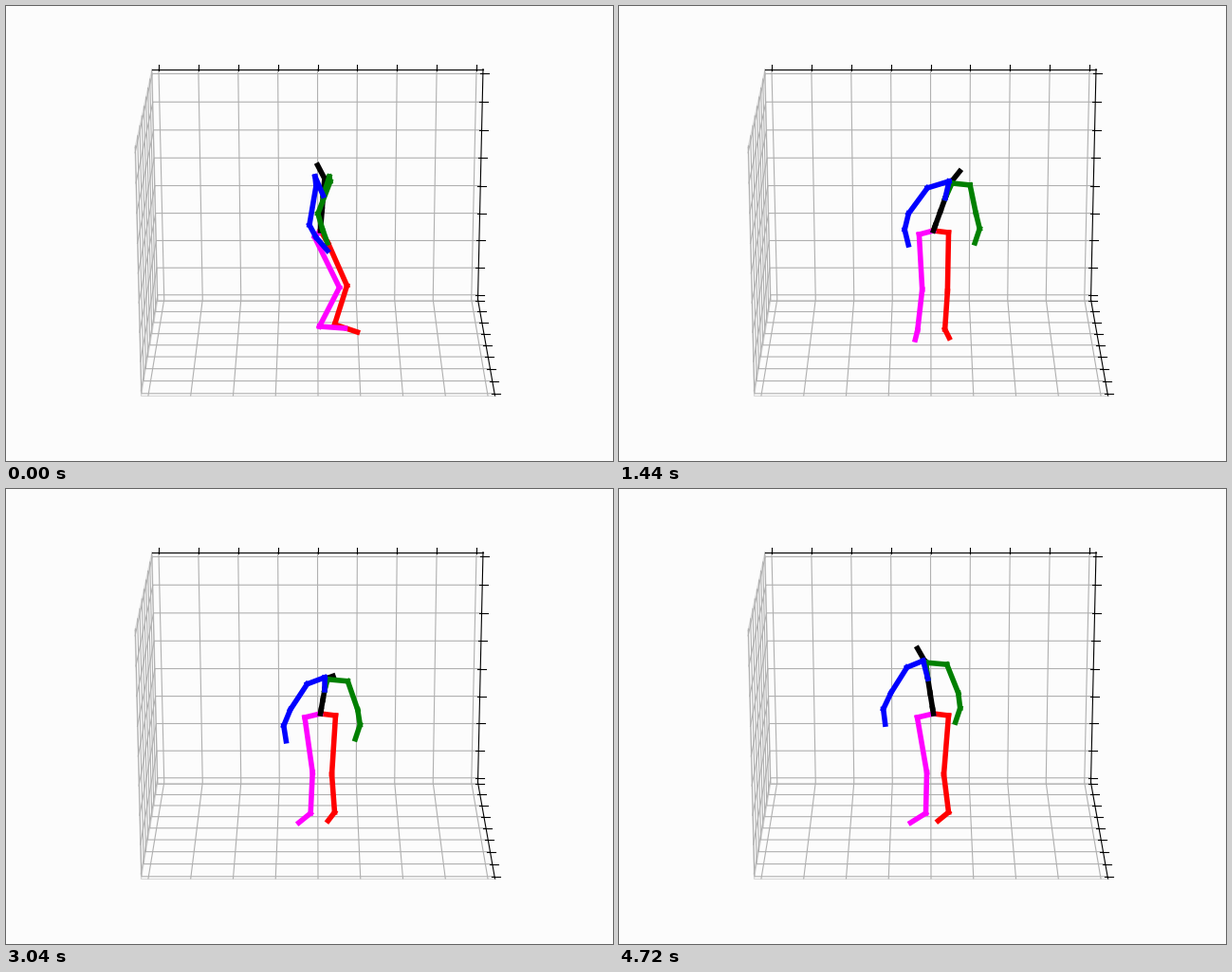
Animation of 640x480 px, one loop 4800 ms. Source, as a matplotlib script:

```python
import numpy as np
import matplotlib.pyplot as plt
from matplotlib.animation import FuncAnimation
from matplotlib.collections import LineCollection

WIDTH, HEIGHT, DPI = 640, 480, 100
FRAMES, INTERVAL = 60, 80
BACKGROUND, GRID, PANE = "#fcfcfc", "#b0b0b0", "#d8d8d8"

fig = plt.figure(figsize=(WIDTH / DPI, HEIGHT / DPI), dpi=DPI, facecolor=BACKGROUND)
ax = fig.add_axes([0, 0, 1, 1])
ax.set_xlim(0, WIDTH)
ax.set_ylim(HEIGHT, 0)
ax.axis("off")

# Corners of the three visible panes.
BACK_TL, BACK_TR = (154, 66.5), (503, 66.5)
BACK_BL, BACK_BR = (160, 309.5), (497.5, 309.5)
FRONT_TL, FRONT_BL, FRONT_BR = (136, 149.5), (142.5, 411), (515.5, 411)


def between(a, b, t):
    return np.array(a) + (np.array(b) - np.array(a)) * t


def stroke(*points, color=GRID):
    ax.plot(*zip(*points), color=color, lw=0.8)


def ticks(bend):
    """Nine tick fractions along an edge, bent by perspective."""
    t = np.linspace(0.02, 0.98, 9)
    return t + bend * t * (1 - t)


def draw_grid(steps, *corners):
    """Run lines over two panes; corners are the three edges they cross."""
    for t in steps:
        stroke(*(between(a, b, t) for a, b in corners))


def draw_axis(a, b, steps, before, after):
    stroke(a, b, color="black")
    for t in steps:
        point = between(a, b, t)
        stroke(point + before, point + after, color="black")


def draw_room():
    columns, rows, depths = ticks(0), ticks(0.025), ticks(-0.1)
    top, bottom = (BACK_TL, BACK_TR), (BACK_BL, BACK_BR)
    left, right = (BACK_TL, BACK_BL), (BACK_TR, BACK_BR)
    floor_left, floor_right = (BACK_BL, FRONT_BL), (BACK_BR, FRONT_BR)

    for edge in [left, bottom, floor_left, (BACK_TL, FRONT_TL),
                 (FRONT_TL, FRONT_BL), (FRONT_BL, FRONT_BR)]:
        stroke(*edge, color=PANE)
    draw_grid(columns, top, bottom, (FRONT_BL, FRONT_BR))
    draw_grid(rows, right, left, (FRONT_TL, FRONT_BL))
    draw_grid(depths, floor_right, floor_left, (BACK_TL, FRONT_TL))
    draw_axis(*top, columns, (0, -5), (0, 1))
    draw_axis(*right, rows, (-3, 0), (6, 0))
    draw_axis(*floor_right, depths, (-3, 0), (6, 0))


def ease(t):
    t = np.clip(t, 0, 1)
    return t * t * (3 - 2 * t)


# What drives the body: a turn to the front, a slow sway, one bow, a late twist.
time = np.arange(FRAMES)[:, None]
turn = 1 - ease(time / 14)
sway = np.cos(2 * np.pi * (time - 20) / 78)
bow = np.exp(-((time - 33) / 11.5) ** 2)
twist = ease((time - 14) / 36)


def make_spine():
    height = np.array([0, 6, 22, 37, 55])
    x = 331.5 + height * (0.09 + 0.25 * sway)
    y = 237 - height * (1 - 0.39 * bow)
    body = np.stack([x, y], axis=2)
    nod = np.stack([8 * sway + 7 * bow - 7 * turn, 14 * bow - 14], axis=2)
    return np.concatenate([body, body[:, -1:] + nod], axis=1)


def make_limb(anchor, base, side, front, drift, pace=1):
    """Chain bones from a base joint, blending side view into front view."""
    side, front = np.array(side), np.array(front)
    weight = (turn ** np.broadcast_to(pace, len(front)))[:, :, None]
    bones = front + weight * (side - front)
    bones[:, :, 0] += twist * np.array(drift)
    joints = spine[:, base, None] + np.cumsum(bones, axis=1)
    return np.concatenate([spine[:, anchor, None], joints], axis=1)


ROOT, CHEST, NECK = 0, 3, 4
LEG_PACE = (1, 3, 3, 0.6)

spine = make_spine()
red_leg = make_limb(
    ROOT, ROOT, pace=LEG_PACE,
    side=[(8, 13), (20, 45), (-13, 41), (24, 8)],
    front=[(16, 2), (-1, 62), (-3, 40), (5, 9)],
    drift=(0, -4, 8, -16))
magenta_leg = make_limb(
    ROOT, ROOT, pace=LEG_PACE,
    side=[(-6, 7), (26, 53), (-21, 41), (27, 2)],
    front=[(-15, 4), (3, 58), (-5, 43), (-2, 10)],
    drift=(-2, 7, 4, -14))
green_arm = make_limb(
    CHEST, NECK,
    side=[(5, -2), (1, 5), (-13, 34), (5, 17), (5, 14)],
    front=[(1, 1), (19, 2), (6, 30), (4, 16), (-5, 15)],
    drift=(0, 3, 6, -2, 0))
blue_arm = make_limb(
    CHEST, NECK,
    side=[(-10, -2), (1, 10), (-7, 41), (7, 13), (12, 14)],
    front=[(-2, -1), (-23, 7), (-20, 27), (-4, 17), (4, 16)],
    drift=(0, 6, 3, -4, -2))

draw_room()
limbs = [("red", red_leg), ("magenta", magenta_leg), ("black", spine),
         ("green", green_arm), ("blue", blue_arm)]
strokes = []
for color, _ in limbs:
    bone = LineCollection([], colors=color, linewidths=4,
                          capstyle="projecting", zorder=3)
    strokes.append(ax.add_collection(bone, autolim=False))


def update(frame):
    for bone, (_, track) in zip(strokes, limbs):
        joints = track[frame]
        bone.set_segments(np.stack([joints[:-1], joints[1:]], axis=1))
    return strokes


anim = FuncAnimation(fig, update, frames=FRAMES, interval=INTERVAL,
                     repeat=True, repeat_delay=0)
plt.show()
```
